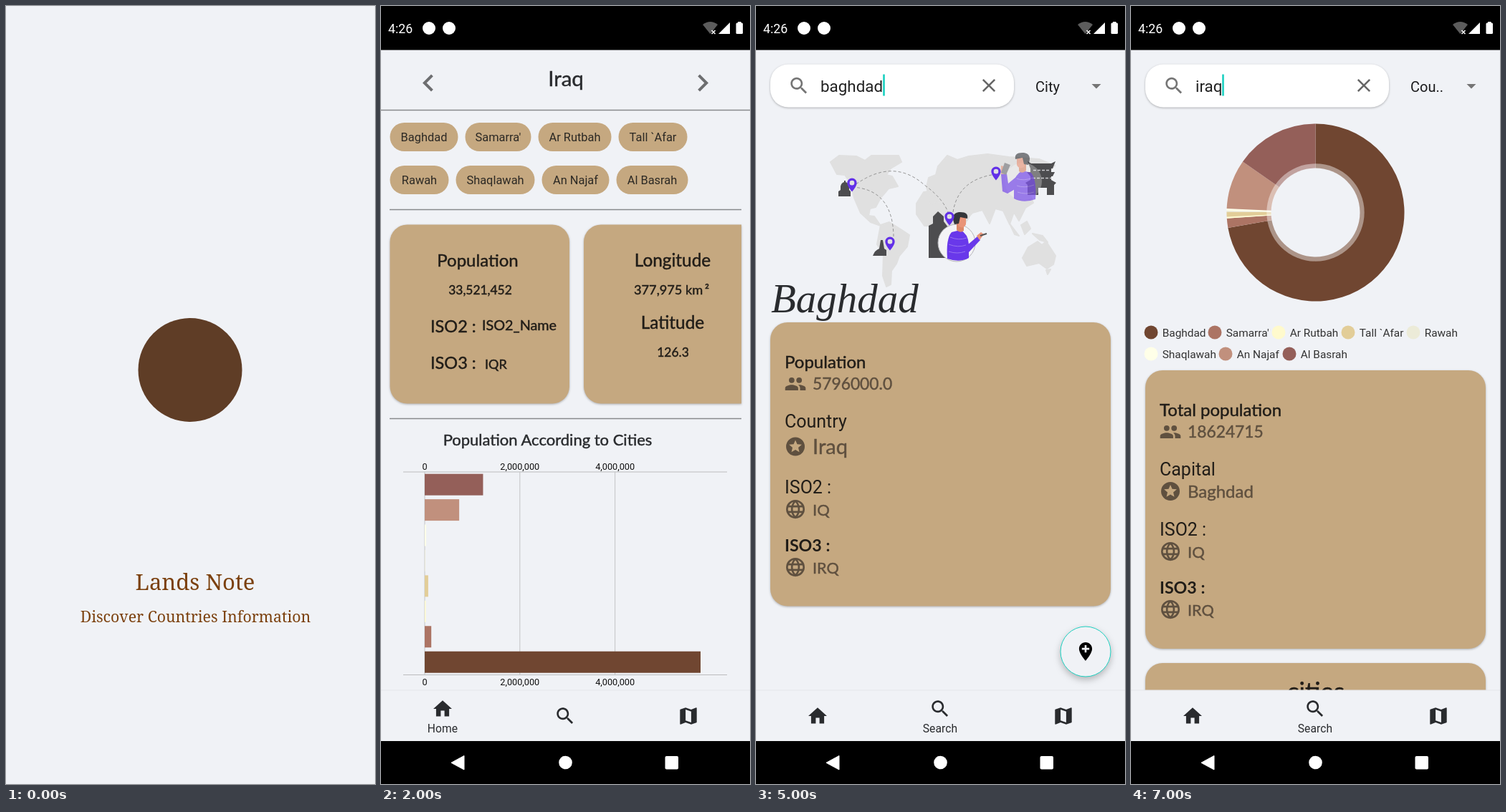
An HTML page that plays this animation: 515x1087 px, repeating every 8 s.

```html
<!DOCTYPE html>
<html lang="en">
<head>
<meta charset="utf-8">
<title>Country facts app</title>
<style>
html, body { margin: 0; width: 100%; height: 100%; overflow: hidden; background: #f0f2f6; }
svg { display: block; width: 100%; height: 100%; }
text { white-space: pre; }
.medium { stroke: currentColor; stroke-width: .45px; }
.lift { filter: drop-shadow(0 1px 1.5px rgba(0,0,0,.28)); }
.high { filter: drop-shadow(0 4px 5px rgba(0,0,0,.25)); }
.menu { filter: drop-shadow(0 5px 10px rgba(0,0,0,.24)); }
</style>
</head>
<body>
<svg id="stage" viewBox="0 0 515 1087"></svg>
<script>
const BG = '#f0f2f6', TAN = '#c5a880', INK = '#292b2e', DARK = '#211d18', SOFT = '#5f503f', TEAL = '#1bd0c0';
const FONT = {
  r: 'Roboto, sans-serif',
  l: 'Lato, sans-serif',
  s: "'Noto Serif', serif",
  i: "'Liberation Serif', serif"
};
const ICON = {
  home: 'M10 20v-6h4v6h5v-8h3L12 3 2 12h3v8z',
  search: 'M15.5 14h-.79l-.28-.27C15.41 12.59 16 11.11 16 9.5 16 5.91 13.09 3 9.5 3S3 5.91 3 9.5 5.91 16 9.5 16c1.61 0 3.09-.59 4.23-1.57l.27.28v.79l5 4.99L20.49 19l-4.99-5zm-6 0C7.01 14 5 11.99 5 9.5S7.01 5 9.5 5 14 7.01 14 9.5 11.99 14 9.5 14z',
  map: 'M20.5 3l-.16.03L15 5.1 9 3 3.36 4.9c-.21.07-.36.25-.36.48V20.5c0 .28.22.5.5.5l.16-.03L9 18.9l6 2.1 5.64-1.9c.21-.07.36-.25.36-.48V3.5c0-.28-.22-.5-.5-.5zM15 19l-6-2.11V5l6 2.11V19z',
  clear: 'M19 6.41L17.59 5 12 10.59 6.41 5 5 6.41 10.59 12 5 17.59 6.41 19 12 13.41 17.59 19 19 17.59 13.41 12z',
  left: 'M15.41 7.41L14 6l-6 6 6 6 1.41-1.41L10.83 12z',
  right: 'M8.59 7.41L10 6l6 6-6 6-1.41-1.41L13.17 12z',
  people: 'M16 11a3 3 0 1 0 0-6 3 3 0 0 0 0 6zm-8 0a3 3 0 1 0 0-6 3 3 0 0 0 0 6zm0 2c-2.33 0-7 1.17-7 3.5V19h14v-2.5c0-2.33-4.67-3.5-7-3.5zm8 0c-.29 0-.62.02-.97.05 1.16.84 1.97 1.97 1.97 3.45V19h6v-2.5c0-2.33-4.67-3.5-7-3.5z',
  star: 'M12 2a10 10 0 1 0 0 20 10 10 0 0 0 0-20zm4.23 16L12 15.45 7.77 18l1.12-4.81-3.73-3.23 4.92-.42L12 5l1.92 4.53 4.92.42-3.73 3.23z',
  pin: 'M12 2C8.14 2 5 5.14 5 9c0 5.25 7 13 7 13s7-7.75 7-13c0-3.86-3.14-7-7-7zm4 8h-3v3h-2v-3H8V8h3V5h2v3h3v2z',
  place: 'M12 2C8.13 2 5 5.13 5 9c0 5.25 7 13 7 13s7-7.75 7-13c0-3.87-3.13-7-7-7zm0 10.5a3.5 3.5 0 1 1 0-7 3.5 3.5 0 0 1 0 7z',
  mic: 'M12 14c1.66 0 3-1.34 3-3V5c0-1.66-1.34-3-3-3S9 3.34 9 5v6c0 1.66 1.34 3 3 3zm5.3-3c0 3-2.54 5.1-5.3 5.1S6.7 14 6.7 11H5c0 3.41 2.72 6.23 6 6.72V21h2v-3.28c3.28-.48 6-3.3 6-6.72z'
};
const COLORS = ['#704631', '#ac7464', '#fffacd', '#e2cd98', '#ecebd8', '#ffffe8', '#c1907d', '#945f59'];
const IRAQ = ['Baghdad', "Samarra'", 'Ar Rutbah', 'Tall `Afar', 'Rawah', 'Shaqlawah', 'An Najaf', 'Al Basrah'];
const SHARE = [260, 6.2, 1, 3.3, .6, 1.4, 32.5, 55];

const rect = (x, y, w, h, fill, rx = 0, more = '') =>
  `<rect x="${x}" y="${y}" width="${w}" height="${h}" rx="${rx}" fill="${fill}" ${more}/>`;
const dot = (x, y, r, fill, more = '') => `<circle cx="${x}" cy="${y}" r="${r}" fill="${fill}" ${more}/>`;
const path = (d, fill, more = '') => `<path d="${d}" fill="${fill}" ${more}/>`;
const line = (d, stroke, w = 1, more = '') => path(d, 'none', `stroke="${stroke}" stroke-width="${w}" ${more}`);
const text = (x, y, s, size, fill = INK, font = 'r', more = '') =>
  `<text x="${x}" y="${y}" font-size="${size}" fill="${fill}" color="${fill}" font-family="${FONT[font]}" ${more}>${s}</text>`;
const MEDIUM = 'class="medium"';
const mid = (x, y, s, size, fill, font, more = '') => text(x, y, s, size, fill, font, 'text-anchor="middle" ' + more);
const icon = (name, x, y, fill = INK, k = 1.3) =>
  path(ICON[name], fill, `fill-rule="evenodd" transform="translate(${x} ${y}) scale(${k}) translate(-12 -12)"`);
const group = (s, more) => `<g ${more}>${s}</g>`;

function statusBar() {
  return rect(0, 0, 515, 61.5, '#000') + text(10, 37.5, '4:26', 17.7, '#fff') +
    dot(67, 31, 9, '#fff') + dot(95, 31, 9, '#fff') +
    path('M449 26Q459.5 18 470 26L459.5 39z', '#5c5c5c') +
    line('M461.5 34l5 5m0-5l-5 5', '#fff', 1.6) +
    path('M487 23v16h-16z', '#fff') + rect(495.5, 23.5, 9.5, 15.5, '#fff', 1.5) + rect(498, 22, 4.5, 3, '#fff');
}

function systemKeys(bg, fg) {
  return rect(0, 1027, 515, 60, bg) + path('M116 1047.5v19.5l-18-9.7z', fg, `stroke="${fg}" stroke-linejoin="round"`) +
    dot(257.5, 1057, 9.3, fg) + rect(396.5, 1048, 18.5, 18.5, fg, 2);
}

function tabs(active) {
  const items = [['home', 86, 'Home'], ['search', 257, 'Search'], ['map', 429, 'Map']];
  return rect(0, 956, 515, 71, BG) + rect(0, 955.5, 515, 1, '#e6e8eb') +
    items.map(([name, x, label], i) => icon(name, x, i === active ? 982 : 992) +
      (i === active ? mid(x, 1014.5, label, 15.6, INK, 'r', 'letter-spacing=".1"') : '')).join('') +
    systemKeys('#000', '#fff');
}

function splash() {
  return dot(257, 508.5, 72.5, '#5f3d26') +
    mid(264, 816, 'Lands Note', 31, '#7b400d', 's') +
    mid(264.5, 861, 'Discover Countries Information', 21.3, '#7b400d', 's');
}

function chips(rows) {
  return rows.flatMap((row, j) => {
    let x = 12.5;
    return row.map(([name, w]) => {
      const s = rect(x, 163 + j * 60, w, 40, TAN, 20) + mid(x + w / 2, 188.5 + j * 60, name, 16.4, '#2c2924');
      x += w + 10;
      return s;
    });
  }).join('');
}

function barChart(widths, step, labels) {
  let s = line('M31 651H483M31 934.5H483', '#bbbcbd');
  labels.forEach((label, i) => {
    const x = 61 + i * step;
    s += line(`M${x} 651V934.5`, '#c3c4c6') + mid(x, 648, label, 12.7, '#111') + mid(x, 949, label, 12.7, '#111');
  });
  return s + widths.map((w, i) => rect(61, 901.7 - i * 35.43, w, 30, COLORS[i])).join('');
}

function home(country) {
  const card = rect(12.5, 305.5, 250.5, 250, TAN, 24, 'class="lift"') +
    mid(135, 364, 'Population', 24, DARK, 'l', MEDIUM) + mid(138.5, 403, '33,521,452', 17.4, DARK, 'l', MEDIUM) +
    text(69, 456, 'ISO2 :', 23.5, DARK, 'l', MEDIUM) + text(141, 453, 'ISO2_Name', 19.8, DARK, 'l', MEDIUM) +
    text(69, 507, 'ISO3 :', 23.5, DARK, 'l', MEDIUM) + text(145, 507, 'IQR', 18, DARK, 'l', MEDIUM);
  const place = path('M503 305.5H307a24 24 0 0 0-24 24v202a24 24 0 0 0 24 24H503z', TAN, 'class="lift"') +
    mid(407, 364, 'Longitude', 24.4, DARK, 'l', MEDIUM) + text(353, 403, '377,975 km', 18.2, DARK, 'l', MEDIUM) +
    text(452, 403, '²', 18, DARK, 'l', MEDIUM) +
    mid(407, 451, 'Latitude', 24.4, DARK, 'l', MEDIUM) + mid(407.5, 490, '126.3', 17.4, DARK, 'l', MEDIUM);
  return icon('left', 66, 107.5, '#6d6e70', 2) + icon('right', 449, 107.5, '#6d6e70', 2) +
    mid(258, 112, country.name, 29.5, INK, 'l', MEDIUM) +
    line('M0 145.5H515M12 284.5H503M12 576.5H503', '#88898c', 1.5) +
    chips(country.chips) + card + place +
    mid(232.5, 614, 'Population According to Cities', 22, INK, 'l', MEDIUM) +
    barChart(country.bars, country.step, country.labels) + tabs(0);
}

const japan = {
  name: 'Japan',
  chips: [[['Tomioka', 94], ['Takahagi', 97], ['Koga', 68], ['Kawanakajima', 137]],
          [['Kawaminami', 126], ['Karumai', 92], ['Kanuma', 91], ['Hiroo', 71]]],
  bars: [22, 385, 8, 58.5, 49, 27, 89, 56], step: 113,
  labels: ['0', '100,000', '200,000', '300,000']
};
const iraq = {
  name: 'Iraq',
  chips: [[['Baghdad', 95], ['Samarra\'', 92], ['Ar Rutbah', 102], ['Tall `Afar', 96]],
          [['Rawah', 82], ['Shaqlawah', 110], ['An Najaf', 94], ['Al Basrah', 100]]],
  bars: SHARE.map(v => v * 385 / 260), step: 132.8,
  labels: ['0', '2,000,000', '4,000,000']
};

function searchBar(query, caret, kind, typing) {
  return rect(20, 81.5, 340, 60, '#fff', 25, 'class="lift"') + icon('search', 60, 111.5, '#757575') +
    text(90, 119.5, query || 'Type city Name', 22.4, query ? '#222' : '#9b9b9b') +
    (query ? icon('clear', 325, 111, '#666') + rect(caret - 1.3, 95.5, 2.6, 30, TEAL) : '') +
    (typing ? line('M90 122.5H127', '#333', 1.5) : '') +
    text(390, 119.5, kind, 20, '#1c1c1e') + path('M468.5 109h13l-6.5 6.5z', '#757575');
}

function lens(x, y) {
  const handle = rect(-6, 56, 12, 22, '#c5d3e3') +
    path('M-11 79q0-4 4-4h14q4 0 4 4l3 67a14 14 0 0 1-28 0z', '#b5713c') +
    path('M-4 75h11q4 0 4 4l3 64q-7 12-14 2z', '#bf7f42');
  return group(group(handle, 'transform="rotate(-28)"') + dot(0, 0, 60.3, '#d1e0ea') + dot(0, 0, 48.5, '#70b0e0') +
    dot(1.5, 3, 45.6, '#8ec5eb') + dot(0, 0, 13, '#a6d2ef'), `transform="translate(${x} ${y})"`);
}

function emptySearch(moved) {
  const pick = (a, b) => moved ? b : a;
  const gold = '#eec831', pale = '#f6d977', lilac = '#b6b0db';
  return mid(257.5, 263, 'What are', 25) + mid(261, 292.5, 'you searching for?', 25) +
    mid(258, 348, 'Search for your favorite thing or find', 22.45) +
    mid(260.5, 374, 'similar results in this area.', 22.45) +
    dot(258, 606, 116, '#f1f1f1') + dot(361, 496.5, 12, gold) + dot(342.5, 490.5, 3, gold) +
    dot(pick(373, 381), pick(528, 530), 6.3, lilac) + dot(352, 556, 3, '#fff') +
    dot(pick(142.5, 143.5), pick(537, 541), 6.3, lilac) + dot(159.5, 617, 8, '#fff') +
    dot(pick(153.5, 151), pick(648, 647), 12, pale) + dot(pick(170.5, 174), pick(659, 664), 3, gold) +
    dot(350, 686, 6, pale) + dot(180, 721.5, 6.3, '#c2bee0') +
    lens(pick(274, 244.5), pick(602.5, 594.5));
}

function globe(x, y) {
  return group(line('M12 3a9 9 0 1 0 0 18 9 9 0 1 0 0-18M12 3c-5 5-5 13 0 18 5-5 5-13 0-18M4 9h16M4 15h16', SOFT, 2),
    `transform="translate(${x} ${y}) scale(1.3) translate(-12 -12)"`);
}

const torso = path('M-15 28Q-17 0-9-9L3-12Q14-7 15 8L15 27Q2 34-15 28z', '#6938ea') +
  line('M-11-2q12 5 23 1M-13 8q13 5 24 1M-13 18q12 4 23 0', '#9874f0', 1) +
  path('M-2-12v-10h10v11q-5 4-10-1z', '#dc8969') + path('M-3-31h14v11q-3 7-10 3z', '#e99478') +
  path('M-5-20q-6-15 6-17 14-1 12 9l-10-2-2 9z', '#35363a');
const reach = path('M13 9L27-3l4 5L15 19z', '#6938ea') + path('M26-4l6-5 4 3-6 8z', '#e99478') + line('M31-4l9-3', '#555', 2);
const raise = path('M11-4L23 6 25-8l8 1-2 24-7 3L12 13z', '#6938ea') + path('M25-8l1-9 7-2v12z', '#e99478') +
  path('M20-20l8-3 5 14-7 3z', '#77777b');

function person(x, y, arm, side = 1, opacity = 1) {
  return group(torso + arm, `transform="translate(${x} ${y}) scale(${side} 1)" opacity="${opacity}"`);
}

function worldScene(fade) {
  const land = [
    'M104 218l12-9 24 1 12 6 9-7 38 0 4 9-15 9-6 9 8 2 8 14-13 3-11 13-7 13-8 2-2 10 8 1 9 13-14-5-14-13-9-21-4-19-9-13-11-1z',
    'M174 306l12-4 16 10 12 8-3 16-11 13-4 11-7 10-1 19-6 3-5-15 1-30-9-14z',
    'M224 276l10-16 20-3 12 6 18 1 8 18 11 2-8 15-7 10-2 18-7 17-9 8-8-4-5-24-4-16-18-1-11-16z',
    'M238 253l3-13 10-4 3-12 13-15 14 6 16-5 26-3 30 4 42 3 22 9-9 9-9 2-4 11-9 4-4 13 5 13-11 7-9 18-7-12-6 17-9-19-11-3-8 21-10-19-14 4-14 15-10-20-12 0-10-12-11 7z',
    'M372 352l8-15 13-8 6 5 6-5 13 20-3 12-9 6-11-8-17 4z',
    'M354 304l13 17-6-2zM370 306l8-5 5 10-8 8zM386 318l14 3 7 9-11-3zM405 369l6-1-4 7z'
  ].map(d => path(d, '#e0e0e0', 'stroke="#e0e0e0" stroke-width="2" stroke-linejoin="round"')).join('');
  const stone = '#4d4d4f';
  const pin = (x, y) => icon('place', x, y, '#6230e8', .95);
  const pagoda = path('M379 217l5 3h28l6-3-4 10h-2v5h5l-3 6h-2v5l7 4-3 3v14h-10v-10h-12v10h-15v-14l-3-3 7-4v-5l-5-6h5v-5z', stone) +
    line('M387 229.5h23M386 240.5h26', '#c9c9cc', 1.5, 'stroke-dasharray="4 2"');
  return land + line('M134 253Q190 210 235 250 264 271 270 294M134 253Q191 256 192 322M275 288Q282 242 335 235', '#919191', 1, 'stroke-dasharray="4 3"') +
    path('M115 266v-7l3-2v-5q1-5 5-6v-2h2v2q4 1 5 6v5l2 2v7z', stone) +
    path('M163 349q3-8 9-10l2-12 3 0 2 12 3 2v8z', stone) +
    path('M241 352v-45l6-3v-10l7-7 8 7v7l6 8v43z', stone) +
    pagoda + dot(373, 245, 26, '#fff', `opacity="${fade * .45}"`) + person(375, 242, raise, -1, fade) +
    dot(280, 331, 26, '#f4f4f6', 'stroke="#b5b5b8"') + person(282, 325, reach) +
    pin(134, 250) + pin(187, 332) + pin(270, 297) + pin(335, 234);
}

function facts(y, [title, count], [label, name, size], tall) {
  const row = (dy, s, font, px) => text(40, y + dy, s, px, DARK, font, font === 'l' ? MEDIUM : '');
  const value = (dy, s, px) => text(79, y + dy, s, px, SOFT, 'l', MEDIUM);
  const big = size > 25;
  return rect(20, y, 475, tall, TAN, 24, 'class="lift"') +
    row(63.5, title, 'l', 24) + icon('people', 55, y + 86, SOFT) + value(94, count, 22.8) +
    row(147, label, 'r', 25) + icon('star', 55, y + (big ? 173.5 : 169), SOFT) + value(big ? 184 : 178, name, size);
}

function codes(y) {
  return text(40, y, 'ISO2 :', 25, DARK) + globe(55, y + 22) + text(79, y + 31, 'IQ', 22, SOFT, 'l', MEDIUM) +
    text(40, y + 81, 'ISO3 :', 23.2, DARK, 'l', 'font-weight="700"') + globe(55, y + 103) +
    text(79, y + 112, 'IRQ', 21.6, SOFT, 'l', MEDIUM);
}

function cityResult(fade) {
  return searchBar('baghdad', 178.5, 'City') + worldScene(fade) +
    text(21, 428, 'Baghdad', 57, INK, 'i', 'font-style="italic"') +
    facts(442, ['Population', '5796000.0'], ['Country', 'Iraq', 29], 396.5) + codes(681) +
    dot(460, 902, 35, BG, `stroke="${TEAL}" class="high"`) + icon('pin', 460, 902, '#000') + tabs(1);
}

function keyboard() {
  const key = (x, y, w, fill = '#fff') => rect(x, y + 1.5, w, 58, '#c0c2c6', 7) + rect(x, y, w, 58, fill, 7);
  const letters = (row, x, y, hints) => [...row].map((c, i) => {
    const kx = x + i * 50.95;
    return key(kx, y, 43.5) + mid(kx + 22, y + 38.5, c, 33.5, '#111') +
      (hints ? mid(kx + 37, y + 14.5, (i + 1) % 10, 13.5, '#555', 'r', 'font-weight="500"') : '');
  }).join('');
  const grey = '#cccdd4', ink = '#424448';
  return rect(0, 674, 515, 354, '#e8eaed') + dot(31, 702, 18.5, '#fff', 'class="lift"') + icon('right', 31, 702, ink, 1.2) +
    ['iraq', 'Iraq', 'Iraqi'].map((s, i) => mid([113, 255.5, 398][i], 710.5, s, 22.4, '#505357')).join('') +
    line('M181 687V717M332 687V717', '#c4c6ca', 1.5) + icon('mic', 490, 701, ink, 1.25) +
    letters('qwertyuiop', 6, 737, true) + letters('asdfghjkl', 31.5, 811) + letters('zxcvbnm', 82, 884.5) +
    key(6, 884.5, 69, grey) + line('M40 901l-13 14h7v11h12v-11h7z', ink, 2.6, 'stroke-linejoin="round"') +
    key(439, 884.5, 69.5, grey) + line('M466 904h22v20h-22l-7-10zM471 909l10 10m0-10l-10 10', ink, 2.4) +
    key(6, 958.5, 69, grey) + mid(40.5, 996, '?123', 22.7, ink, 'r', 'font-weight="500"') +
    key(82, 958.5, 44, grey) + mid(104, 1004, ',', 25, '#111') +
    key(133, 958.5, 43.5) + line('M155 976a11.5 11.5 0 1 0 .1 0M148 991q7 7 14 0', ink, 2.3) +
    dot(150.5, 984.5, 2, ink) + dot(159.5, 984.5, 2, ink) +
    key(184, 958.5, 197.5) + key(388.5, 958.5, 43.5, grey) + mid(410, 1004, '.', 25, '#111') +
    key(439, 958.5, 69.5, '#1b73e8') + icon('search', 474, 987, '#fff', 1.25) +
    systemKeys('#fff', '#f4f4f4');
}

function typing() {
  const menu = ['City', 'Country', 'Location'].map((s, i) => text(390, 119.5 + i * 60, s, 20, '#111')).join('');
  return searchBar('iraq', 128.5, '', true) + emptySearch(true) +
    rect(380, 81.5, 97, 180.5, '#fff', 2, 'class="menu"') + menu + keyboard();
}

function donut(cx, cy, r) {
  const at = deg => {
    const a = deg * Math.PI / 180;
    return `${cx + r * Math.sin(a)} ${cy - r * Math.cos(a)}`;
  };
  let from = 0;
  const slices = SHARE.map((v, i) => {
    const d = `M${cx} ${cy}L${at(from)}A${r} ${r} 0 ${+(v > 180)} 1 ${at(from += v)}z`;
    return path(d, COLORS[i]);
  }).join('');
  return slices + dot(cx, cy, r * .55, '#fff', 'opacity=".42"') + dot(cx, cy, r / 2, BG);
}

function countryResult() {
  const starts = [28, 117, 206, 303, 394, 28, 132, 221];
  const legend = IRAQ.map((name, i) => {
    const y = i < 5 ? 456 : 486;
    return dot(starts[i], y, 9.5, COLORS[i]) + text(starts[i] + 15.7, y + 5.5, name, 15.4, '#333');
  }).join('');
  return searchBar('iraq', 128.5, 'Cou..') + donut(257.5, 288.5, 124) + legend +
    facts(509, ['Total population', '18624715'], ['Capital', 'Baghdad', 24], 389) + codes(740) +
    rect(20, 918, 475, 100, TAN, 24, 'class="lift"') + mid(258, 970, 'cities', 35, DARK, 'l', MEDIUM) + tabs(1);
}

const scenes = [
  splash,
  () => statusBar() + home(japan),
  () => statusBar() + home(iraq),
  () => statusBar() + searchBar('', 0, 'City') + emptySearch(false) + tabs(1),
  () => statusBar() + cityResult(.8),
  () => statusBar() + cityResult(.62),
  () => statusBar() + typing(),
  () => statusBar() + countryResult()
];
const stage = document.getElementById('stage');
const start = performance.now();
let shown = -1;

function draw() {
  const n = Math.floor((performance.now() - start) % 8000 / 1000);
  if (n !== shown) {
    shown = n;
    stage.innerHTML = rect(0, 0, 515, 1087, BG) + scenes[n]();
  }
  requestAnimationFrame(draw);
}
draw();
</script>
</body>
</html>
```
